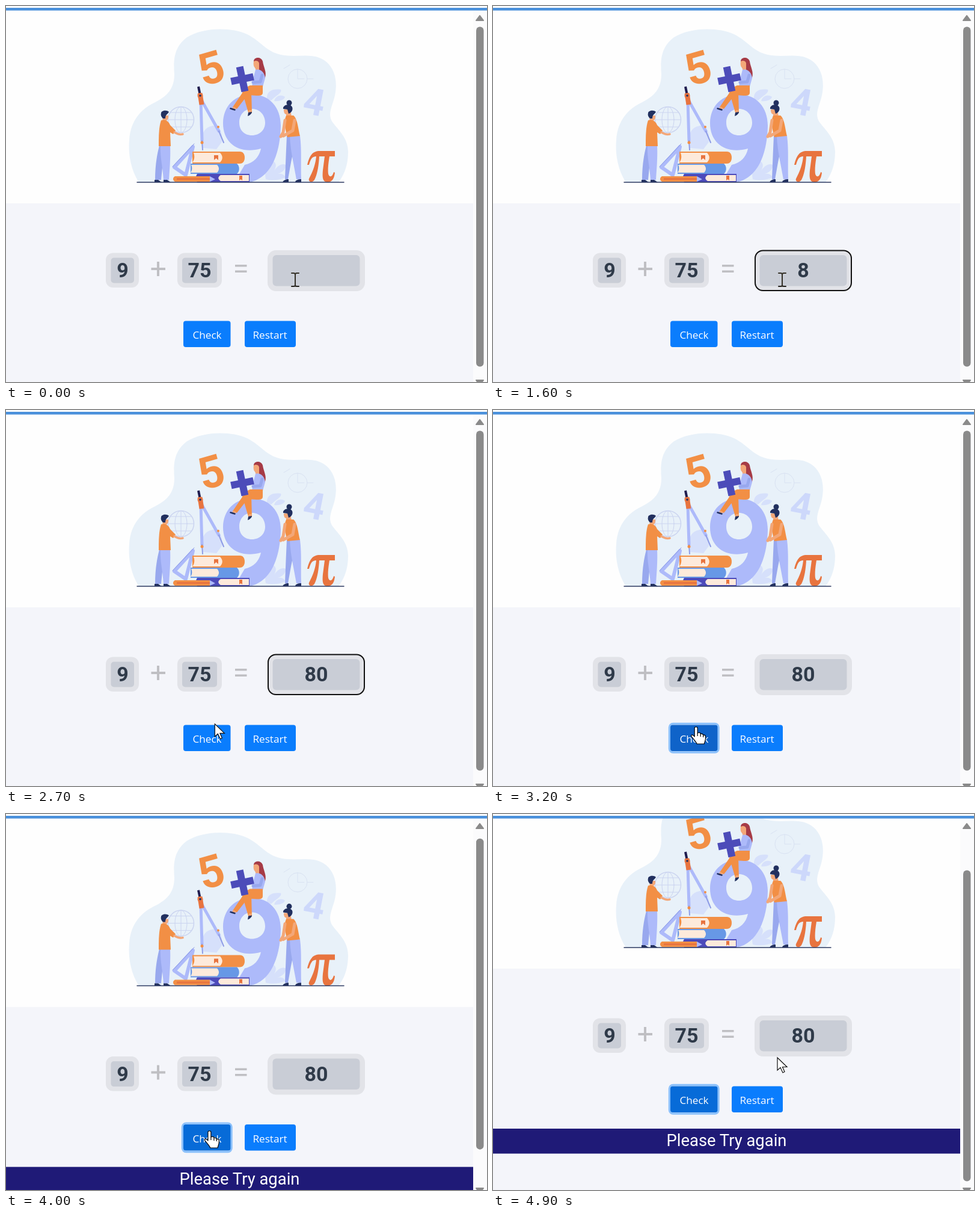
Animation of 800 by 625 pixels, one loop 5000 ms. Source, as an HTML page:

```html
<!DOCTYPE html>
<html lang="en">
<head>
<meta charset="utf-8">
<title>Addition quiz</title>
<style>
html, body { margin: 0; width: 100%; height: 100%; overflow: hidden; background: #fff; }
svg { display: block; width: 800px; height: 625px; }
text { text-anchor: middle; }
.digit { font: bold 34px Roboto, Arial, sans-serif; fill: #2f3a49; }
.label { font: 17.2px "Open Sans", "Noto Sans", sans-serif; fill: #fff; }
.item { font: 17.6px "Open Sans", "Noto Sans", sans-serif; fill: #111; }
.banner { font: 27.4px Roboto, Arial, sans-serif; fill: #fff; }
.big { font-family: Roboto, Arial, sans-serif; font-weight: bold; }
.frame { fill: #e2e3e8; }
.well { fill: #c9cdd6; }
.lav { fill: #adbafa; }
.org { fill: #f28f45; }
.navy { fill: #22305f; }
.skin { fill: #f3a778; }
.cream { fill: #fdeadb; }
.pale { fill: #d6e0fb; }
.line { fill: none; stroke-linecap: round; stroke-linejoin: round; }
#ibeam { mix-blend-mode: difference; }
</style>
</head>
<body>
<svg viewBox="0 0 800 625">
  <defs>
    <clipPath id="view"><rect y="7" width="777" height="618"/></clipPath>
    <filter id="shadow" x="-10%" y="-10%" width="120%" height="125%">
      <feDropShadow dx="0" dy="1" stdDeviation="2" flood-color="#334" flood-opacity=".28"/>
    </filter>
  </defs>
  <rect width="800" height="625" fill="#fefefe"/>
  <g clip-path="url(#view)">
    <g id="page">
      <rect y="328" width="777" height="400" fill="#f4f5fa"/>

      <!-- illustration -->
      <path fill="#e8f1f9" d="M221 293C208 273 203 247 205 223C207 190 225 171 248 160C270 149 280 136 280 113C278 88 280 68 301 52C326 36 373 34 401 47C425 59 431 75 457 81C486 87 511 75 533 93C549 107 552 130 546 153C541 170 535 181 543 193C554 208 568 218 569 242C569 264 563 280 553 293Z"/>
      <g class="line" stroke="#d9e2f2">
        <circle cx="485" cy="121" r="16"/>
        <path d="M485 105V121H496M472 98L462 104M502 121H511"/>
      </g>
      <g class="pale">
        <path d="M327 236C323 215 328 202 344 199C355 198 361 210 359 226L350 238Z"/>
        <path d="M434 155C433 143 441 137 457 139C460 144 449 149 441 157ZM446 158C449 148 458 147 464 151C463 156 455 159 446 158Z"/>
        <path d="M432 288C429 270 436 259 445 258C452 263 448 271 444 276C452 264 460 261 465 264C466 273 457 278 449 280C457 277 464 280 464 285C455 290 441 290 432 288Z"/>
      </g>
      <text class="big" font-size="74" fill="#f28f45" transform="translate(341 103) rotate(-16)" y="26">5</text>
      <text class="big" font-size="62" fill="#cdd8fb" transform="translate(513 159) rotate(11)" y="22">4</text>
      <path class="lav" fill-rule="evenodd" d="M409 147C438 147 457 168 457 199C456 247 440 286 405 293H380L397 264C411 261 421 252 424 237C389 247 361 229 361 195C361 167 380 147 409 147ZM409 171C396 171 388 181 388 194C388 206 396 215 409 215C422 215 431 206 431 194C431 181 422 171 409 171Z"/>
      <path fill="#e8743f" d="M501 264C505 247 511 241 522 241H547V250H538C536 262 535 273 536 279C538 286 543 284 545 276L547 277C546 288 541 293 535 293C526 293 526 284 527 273L530 250H521C520 268 517 282 513 289C510 294 502 293 504 287C506 282 514 270 516 250C510 250 507 253 504 264Z"/>

      <!-- compass -->
      <g class="line">
        <path stroke="#adbafa" stroke-width="5" d="M324 158L326 224M326 158L354 208"/>
        <path stroke="#8e9ce6" stroke-width="2" d="M326 224L327 239M354 208L362 227"/>
        <path stroke="#201d4f" stroke-width="4" stroke-linecap="butt" d="M320 134L322.500 146"/>
        <path stroke="#e8743f" stroke-width="8" stroke-linecap="butt" d="M322.500 145L325.500 164"/>
      </g>
      <circle cx="323" cy="149" r="4.500" fill="#e8743f"/><circle cx="323" cy="149" r="1.800" class="navy"/>
      <circle cx="326" cy="227" r="2.500" class="org"/><circle cx="353" cy="201" r="2" class="org"/>

      <!-- man with globe -->
      <g class="line" stroke="#cbd4f0">
        <circle cx="291" cy="189" r="21.500" stroke-width="1.500"/>
        <ellipse cx="291" cy="189" rx="10" ry="21.500"/>
        <path d="M291 168V210M270 189H312M274 177H308M274 201H308"/>
      </g>
      <path fill="#98a8ee" d="M255 232H266L261 258L258 289H248C248 265 251 248 255 232Z"/>
      <path class="lav" d="M257 232H273C274 252 272 272 271 289H262C261 270 256 252 257 232Z"/>
      <path class="navy" d="M247 293V289H253L259 293ZM262 293V289H268L274 293Z"/>
      <path class="skin" d="M261 182H270V186C269 190 265 191 265 194H260Z"/>
      <path class="navy" d="M258 178C258 174 267 172 271 176C269 180 265 180 265 187H261C258 184 257 181 258 178Z"/>
      <path class="org" d="M258 190C264 188 271 191 273 198L282 207L278 213L273 210L274 233H254C254 216 254 202 258 190Z"/>
      <path class="line" stroke="#f3a778" stroke-width="3.500" d="M280 210C285 213 290 214 294 213"/>

      <!-- set square, books, pencil -->
      <path class="line" stroke="#adbafa" stroke-width="6" d="M280 268L311 234L299 281Z"/>
      <path class="line" stroke="#8595e3" stroke-width="1" d="M277 267L313 229"/>
      <path class="org" d="M310 242H389C394 242 397 246 397 252C397 258 394 262 389 262H310Z"/>
      <path class="cream" d="M312 244H356C361 249 361 255 356 260H310C314 255 314 249 312 244Z"/>
      <path fill="#e8743f" d="M346 248H353V256L349.500 253L346 256Z"/>
      <path fill="#6798e6" d="M307 262H384C389 266 389 275 384 279H307Z"/>
      <path class="cream" d="M308 264H351C355 268 355 273 351 277H307C310 273 310 268 308 264Z"/>
      <path fill="#4c4aba" d="M318 279H405V293H318C315 288 315 284 318 279Z"/>
      <path class="cream" d="M357 281H404V291H357C352 288 352 284 357 281Z"/>
      <path fill="#e8743f" d="M388 282H393V290L390.500 288L388 290Z"/>
      <path class="org" d="M281 283H339V292H281C277 290 277 285 281 283Z"/>
      <path fill="#e8743f" d="M284 286H339V289H284Z"/>
      <path class="lav" d="M339 283L348 288L339 292Z"/>

      <!-- seated woman with plus sign -->
      <path fill="#a63b46" d="M412 93C411 85 424 83 427 92C428 101 434 109 431 119C427 122 418 119 417 112Z"/>
      <path class="skin" d="M412 92C416 90 420 91 421 95L421 108H415V103C412 102 411 97 412 92Z"/>
      <path class="lav" d="M415 106C423 104 430 110 431 120L427 134H409L411 121Z"/>
      <path class="org" d="M406 132H427V144C427 149 422 149 417 149L402 148L384 171L377 168L392 146C396 139 400 134 406 132Z"/>
      <path class="org" d="M393 143L408 141L409 178L403 177Z"/>
      <path class="skin" d="M378 167L383 170L381 172L376 170ZM404 173H409L407 179H403Z"/>
      <path class="navy" d="M373 169C377 170 380 171 382 172L381 174C377 173 374 172 372 171ZM403 177L409 176C409 179 405 182 402 183Z"/>
      <path fill="#4c4cb9" transform="translate(393 121.500) rotate(-12)" d="M-6-21H6V-6H19V6H6V21H-6V6H-19V-6H-6Z"/>
      <path class="line" stroke="#98a8ee" stroke-width="5" d="M426 115L423 126L411 127"/>

      <!-- standing woman -->
      <path fill="#98a8ee" d="M467 216H483L474 260L469 288H464C465 262 466 237 467 216Z"/>
      <path class="lav" d="M472 216H489C492 238 490 264 491 288H483C479 265 473 241 472 216Z"/>
      <path class="navy" d="M460 293C461 290 465 288 470 288L470 293ZM481 293C481 290 485 288 491 288L491 293Z"/>
      <path class="skin" d="M462 172H473L475 184H466L466 180C463 180 462 176 462 172Z"/>
      <circle cx="471" cy="161" r="4.500" class="navy"/>
      <path class="navy" d="M461 171C460 164 473 161 476 168C478 173 474 178 470 179L468 172Z"/>
      <path class="org" d="M466 182H478C485 187 486 205 489 216L468 218C465 206 461 193 466 182Z"/>
      <path class="line" stroke="#f3a778" stroke-width="5" d="M480 190L477 207L461 216M464 190L461 210L457 217"/>
      <path class="line" stroke="#2c3a62" stroke-width="1.500" d="M218 293H562"/>

      <!-- sum -->
      <rect class="frame" x="166" y="410.500" width="55" height="57.500" rx="12"/>
      <rect class="well" x="174.500" y="418.500" width="38.500" height="42" rx="5"/>
      <rect class="frame" x="285" y="410.500" width="74" height="57.500" rx="12"/>
      <rect class="well" x="293" y="418.500" width="58" height="42" rx="5"/>
      <rect class="frame" x="435" y="406" width="162" height="68" rx="14"/>
      <rect class="well" x="443.500" y="414" width="145" height="51.500" rx="6"/>
      <text class="digit" x="194" y="451">9</text>
      <text class="digit" x="322" y="451">75</text>
      <text class="digit" id="answer" x="516" y="451"></text>
      <path fill="#bfbfc3" d="M251 425H255V435H265V439H255V449H251V439H241.500V435H251ZM381 430H400.500V433.500H381ZM381 439.500H400.500V443H381Z"/>
      <rect id="focus" x="436" y="406.500" width="160" height="66.500" rx="13" fill="none" stroke="#111" stroke-width="2"/>

      <!-- buttons -->
      <rect id="glow" x="293.500" y="521.500" width="81.500" height="47.500" rx="6" fill="none" stroke="#8cc1fb" stroke-width="3.400"/>
      <rect id="check" x="295" y="523.500" width="78.500" height="43.500" rx="4"/>
      <rect id="restart" x="397" y="523.500" width="85" height="43.500" rx="4" fill="#0a7dfd"/>
      <text class="label" x="334.500" y="553">Check</text>
      <text class="label" x="439" y="553">Restart</text>

      <g id="result">
        <rect y="594" width="777" height="41.500" fill="#1f1a77"/>
        <text class="banner" x="388.500" y="623">Please Try again</text>
      </g>
    </g>
  </g>

  <rect y="3" width="800" height="4.500" fill="#4a90db"/>
  <rect x="777" y="8" width="23" height="617" fill="#fbfbfc"/>
  <path fill="#8a8a8a" stroke="#8a8a8a" stroke-width="2" stroke-linejoin="round" d="M788 16L794 24H782ZM782 622H794L788 630Z"/>
  <rect id="thumb" x="782" width="12.500" rx="6.200" fill="#8a8a8a"/>

  <g id="popup">
    <path filter="url(#shadow)" fill="#fff" d="M496 486H504L515.500 475L527 486H699Q709 486 709 496V590Q709 600 699 600H496Q486 600 486 590V496Q486 486 496 486Z"/>
    <text class="item" x="514" y="525">97</text>
    <text class="item" x="514" y="576">98</text>
  </g>

  <path id="ibeam" class="line" stroke="#fff" stroke-width="2" d="M-6-11H-2.500Q0-11 0-8.500V8.500Q0 11-2.500 11H-6M6-11H2.500Q0-11 0-8.500M0 8.500Q0 11 2.500 11H6"/>
  <g id="hand" stroke="#000" stroke-width="1.200" stroke-linejoin="round">
    <path fill="#fff" d="M-3 2C-3-1 2-1 2 2V10C5 8.500 7 9.500 7 11.500C9 10.500 11 11.500 11.500 13.500C14 12.500 15.500 14 15.500 17C15.500 22 14 24 13 28H1C-1 23-6 19-8.500 15C-9 12-5 12.500-3 16Z"/>
    <path fill="none" d="M2 10V15M7 11.500V16M11.500 13.500V17"/>
  </g>
  <path id="arrow" fill="#fff" stroke="#111" stroke-width="1.200" d="M0 0V21L5 16.500L9 25L12 23.500L8.500 15.500H16Z"/>
</svg>
<script>
const LOOP = 5000, STEP = 100, SCROLL = 71;
const CLICK_FIELD = 300, TYPE_8 = 1400, TYPE_0 = 1700, PRESS = 3000, RELEASE = 3300, RESULT = 3400;
// pointer stops: time, x, y
const PATH = [[2100, 481, 455], [2200, 464, 457], [2800, 338, 527], [4300, 339, 527], [4800, 473, 405]];

const $ = id => document.getElementById(id);
const set = (id, attrs) => { for (const k in attrs) $(id).setAttribute(k, attrs[k]); };
const show = (id, on) => set(id, { visibility: on ? 'visible' : 'hidden' });
const clamp = v => Math.max(0, Math.min(1, v));
const ease = v => v * v * (3 - 2 * v);
const inside = (x, y, l, t, r, b) => x >= l && x <= r && y >= t && y <= b;

function pointer(t) {
  let [, x, y] = PATH[0];
  for (let i = 1; i < PATH.length; i++) {
    const [t0, x0, y0] = PATH[i - 1], [t1, x1, y1] = PATH[i];
    if (t < t0) break;
    const p = ease(clamp((t - t0) / (t1 - t0)));
    x = x0 + (x1 - x0) * p;
    y = y0 + (y1 - y0) * p;
  }
  return [x, y];
}

function render(t) {
  const scroll = SCROLL * ease(clamp((t - 3950) / 250));
  const [x, y] = pointer(t);
  const pageY = y + scroll;
  const hover = inside(x, pageY, 295, 523, 374, 567);
  const overText = inside(x, pageY, 435, 406, 597, 474) ||
    (t >= RESULT && inside(x, pageY, 289, 596, 488, 634));
  const kind = hover ? 'hand' : overText ? 'ibeam' : 'arrow';
  const shown = t >= RESULT;

  set('page', { transform: `translate(0 ${-scroll})` });
  $('answer').textContent = t >= TYPE_0 ? '80' : t >= TYPE_8 ? '8' : '';
  show('focus', t >= CLICK_FIELD && t < PRESS);
  show('popup', t >= CLICK_FIELD && t < TYPE_8);
  show('glow', t >= PRESS);
  show('result', shown);
  const down = t >= PRESS && t < RELEASE;
  set('check', { fill: down ? '#0f63c9' : hover || t >= PRESS ? '#076bd8' : '#0a7dfd' });
  set('thumb', { y: 34.5 + scroll * 59 / SCROLL, height: shown ? 517 : 565 });
  for (const id of ['ibeam', 'hand', 'arrow']) {
    show(id, id === kind);
    set(id, { transform: `translate(${x} ${y})` });
  }
}

const start = performance.now();
function tick() {
  const t = (performance.now() - start) % LOOP;
  render(Math.floor(t / STEP) * STEP);
  requestAnimationFrame(tick);
}
tick();
</script>
</body>
</html>
```
